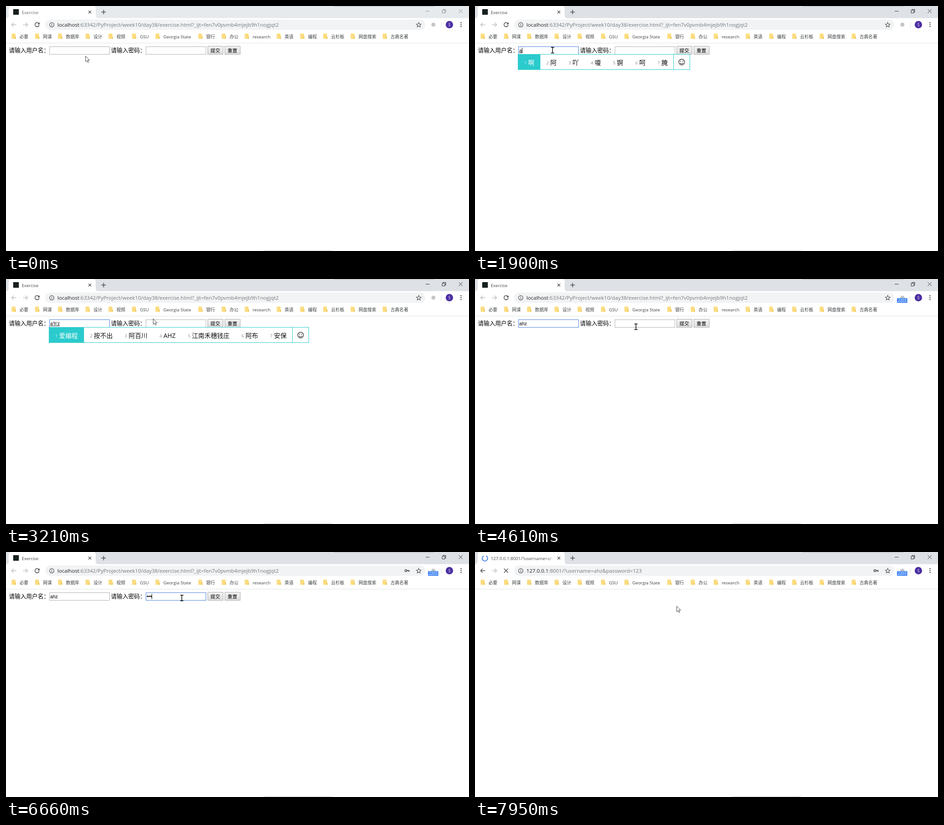
These frames come from a looping animation (1027 by 545 pixels, 8 s). An HTML page:

```html
<!DOCTYPE html>
<html lang="zh-CN">
<head>
<meta charset="utf-8">
<title>Exercise</title>
<style>
  html, body { margin: 0; width: 100%; height: 100%; overflow: hidden; background: #fff; }
  svg { display: block; width: 1027px; height: 545px; }
  text { font-family: "Open Sans", "Noto Sans CJK SC", "Noto Sans CJK", sans-serif; white-space: pre; }
  .field { font-family: "Liberation Sans", "Noto Sans CJK SC", sans-serif; }
</style>
</head>
<body>
<svg id="stage" viewBox="0 0 1027 545" xmlns="http://www.w3.org/2000/svg"></svg>
<script>
const LOOP = 8000, BLINK = 530;
const FOCUS = 1200, COMMIT = 3770, BADGE = 3840, PASSWORD = 5030;
const PRESS = 7210, SUBMIT = 7400, LOADED = 7700;
const TEAL = '#2bcbcd', DARK = '#4a4d51';
const IME_SIZE = 13.93, IME_PAD = 35.36;

const rect = (x, y, w, h, fill, extra = '') =>
  `<rect x="${x}" y="${y}" width="${w}" height="${h}" fill="${fill}" ${extra}/>`;
const line = (d, color, w = 1, extra = '') =>
  `<path d="${d}" fill="none" stroke="${color}" stroke-width="${w}" ${extra}/>`;
const circle = (x, y, r, fill, extra = '') =>
  `<circle cx="${x}" cy="${y}" r="${r}" fill="${fill}" ${extra}/>`;
const text = (x, y, size, fill, str, extra = '') =>
  `<text x="${x}" y="${y}" font-size="${size}" fill="${fill}" ${extra}>${str}</text>`;

// Typed text of the user field: time, shown text, width
const typed = [
  [1740, 'a', 6],
  [2450, "a'h", 14],
  [2680, "a'h'z", 21.3],
  [COMMIT, 'ahz', 17.2]
];
const dotTimes = [5960, 6260, 6510];
const caretResets = [FOCUS, 1740, 2450, 2680, BADGE, PASSWORD, ...dotTimes];

const candidates = [
  [1900, ['啊', '阿', '吖', '嗄', '锕', '呵', '腌']],
  [2450, ['阿布', '安保', '按比', '爱不', '阿爸', '阿伯', '按部']],
  [2680, ['爱编程', '按不出', '阿百川', 'AHZ', '江南禾穗钱庄', '阿布', '安保']]
];

// Pointer moves: first step, last step, number of steps, end point
const moves = [
  [200, 510, 5, 172, 98],
  [660, 660, 1, 165, 95],
  [750, 750, 1, 176, 101],
  [1080, 1300, 3, 172, 98],
  [2680, 2980, 5, 326, 88],
  [4380, 4380, 1, 331, 97],
  [4530, 4610, 2, 357, 106],
  [4780, 4950, 3, 360, 102],
  [6580, 7050, 7, 465, 101],
  [7480, 7860, 5, 447, 120]
];

const last = (list, t) => list.filter(item => item[0] <= t).pop();

function pointerAt(t) {
  let x = 176, y = 111;
  for (const [from, to, steps, ex, ey] of moves) {
    if (t < from) break;
    const gap = (to - from) / Math.max(1, steps - 1);
    const done = gap ? Math.min(steps, Math.floor((t - from) / gap + 0.001) + 1) : steps;
    x += (ex - x) * done / steps;
    y += (ey - y) * done / steps;
  }
  return [Math.round(x), Math.round(y)];
}

function bookmarks() {
  const items = [[30, '必要'], [82, '网课'], [133, '数据库'], [194, '设计'], [245, '视频'],
    [297, 'GSU'], [349, 'Georgia State'], [444, '银行'], [496, '办公'], [547, 'research'],
    [618, '英语'], [670, '编程'], [721, '云杉板'], [782, '网盘搜索'], [853, '古典名著']];
  return items.map(([x, name]) =>
    rect(x - 17.5, 61.5, 8.5, 11.5, '#fbdc80', 'rx="0.8"') +
    rect(x - 10, 67.5, 2, 5.5, '#f1c659', 'rx="0.5"') +
    text(x, 71.5, 9.8, '#3c4043', name)).join('');
}

function chrome() {
  const star = Array.from({ length: 10 }, (_, i) => {
    const a = i * Math.PI / 5, r = i % 2 ? 2.5 : 5.6;
    return `${(915.5 + r * Math.sin(a)).toFixed(1)} ${(42 - r * Math.cos(a)).toFixed(1)}`;
  }).join('L');
  return rect(0, 27, 1027, 518, '#fff') +
    '<path d="M0 27Q6 27 6 21V6Q6 0 12 0H193Q199 0 199 6V21Q199 27 205 27Z" fill="#fff"/>' +
    rect(727, 0, 223, 1.5, '#c6c9ce') +
    line('M183 10.5l6 6m0-6l-6 6', DARK, 1.3) +
    line('M211.5 13.5h10m-5-5v10', DARK, 1.5) +
    rect(87, 30, 843, 23, '#f1f3f4', 'rx="11.5"') +
    line('M38 41.5h10m-4.5-4.5l4.5 4.5l-4.5 4.5', '#bdbfc2', 1.4) +
    circle(101.5, 41.8, 4.9, 'none', `stroke="${DARK}" stroke-width="1.2"`) +
    line('M101.5 41v3.3m0-5.2v1.1', DARK, 1.2) +
    line(`M${star}Z`, DARK, 1.1) +
    rect(965, 36, 1, 12, '#dadce0') +
    circle(983.5, 41.5, 8.2, '#4b2da3') +
    text(983.5, 44.7, 8.5, '#fff', 'S', 'text-anchor="middle"') +
    [37.3, 41.5, 45.7].map(y => circle(1009.3, y, 1.3, DARK)).join('') +
    bookmarks() +
    rect(0, 82, 1027, 1, '#e0e2e4') +
    rect(571, 544, 152, 1, '#c9c9c9');
}

function windowBar(t) {
  const active = t >= FOCUS;
  const ink = active ? '#333' : '#8c8f93';
  return rect(0, 0, 1027, 27, active ? '#dee1e6' : '#e7eaed') +
    line('M931 11.5h8.5', ink) +
    line('M967.5 9.5h6v6h-6zM969.5 9.5v-2h6v6h-2', ink) +
    line('M1004.3 7.3l8.4 8.4m0-8.4l-8.4 8.4', ink);
}

function tab(t) {
  const spin = t >= SUBMIT, loaded = t >= LOADED;
  const color = loaded ? '#3b78e0' : '#9aa0a6';
  const turn = (t - 7950) * (loaded ? 0.4 : -0.4);
  const icon = spin
    ? line('M24.5 8.6A6 6 0 1 1 19.5 8.6', color, 1.7, `transform="rotate(${turn.toFixed(1)} 22 14)"`)
    : rect(16, 7, 12.5, 12.5, '#16201f');
  const title = loaded ? '127.0.0.1:8001/?username=ahz' : 'Exercise';
  return icon +
    text(35, 17.5, 9.8, t < FOCUS ? '#6b6e72' : '#45484c', title, 'clip-path="url(#tabClip)"') +
    rect(160, 4, 14, 20, 'url(#fade)');
}

function toolbar(t) {
  const loaded = t >= LOADED;
  const [host, path] = loaded
    ? ['127.0.0.1', ':8001/?username=ahz&amp;password=123']
    : ['localhost', ':63342/PyProject/week10/day38/exercise.html?_ijt=fen7v0pvmb4mjejb9h1nogjqt2'];
  let out = line('M22.5 41.5h-10m4.5-4.5l-4.5 4.5l4.5 4.5', loaded ? DARK : '#bdbfc2', 1.4);
  out += t >= SUBMIT
    ? line('M64.5 37l9 9m0-9l-9 9', DARK, 1.5)
    : line('M72.6 38.5A4.7 4.7 0 1 0 73.6 42.5', DARK, 1.5) +
      `<path d="M74.5 36.3v4.7h-4.7z" fill="${DARK}"/>`;
  out += text(114, 46, 11.62, '#202124', `${host}<tspan fill="#757a7f">${path}</tspan>`);
  if (t >= dotTimes[0])
    out += circle(887, 41.5, 2.2, 'none', `stroke="${DARK}" stroke-width="1.6"`) +
      line('M889.3 41.5h6m-1.6 0v2.6', DARK, 1.8);
  out += circle(948, 41.5, 4.5, '#c4c7ca');
  if (t >= BADGE)
    out += rect(936, 42.5, 23, 10.5, '#4285f4', 'rx="1.5"') +
      text(947.5, 50.9, 8.3, '#fff', '2203', 'text-anchor="middle"');
  return out;
}

const input = (x, focused) =>
  rect(x + 0.5, 90.5, 133, 17, '#fff', `stroke="${focused ? '#4a82dc' : '#b2b2b2'}"`);

const button = (x, name, hot) =>
  rect(x + 0.5, 89.5, 34, 18, hot ? 'url(#hot)' : 'url(#face)', `stroke="${hot ? '#a0a6a6' : '#ababab'}"`) +
  text(x + 6.5, 102.6, 10.67, '#000', name, 'class="field"');

function form(t, [px]) {
  const inUser = t >= FOCUS && t < PASSWORD;
  const inPass = t >= PASSWORD && t < PRESS;
  const word = last(typed, t);
  const dots = dotTimes.filter(d => d <= t).length;
  let out = text(6.4, 103.2, 12.8, '#000', '请输入用户名：') + input(96, inUser) +
    text(232.8, 103.2, 12.8, '#000', '请输入密码：') + input(310, inPass) +
    button(447, '提交', px >= 447 && px <= 482) + button(485, '重置', false);
  if (word) {
    out += text(98, 102.5, 10.67, '#000', word[1], 'class="field"');
    if (t < COMMIT) out += rect(98, 104, word[2], 1, '#333');
  }
  for (let i = 0; i < dots; i++) out += circle(313.9 + 3.75 * i, 98.7, 1.6, '#111');
  if (inUser || inPass) {
    const since = t - caretResets.filter(c => c <= t).pop();
    const x = inPass ? 312 + 3.75 * dots : 98 + (word ? word[2] : 0);
    if (Math.floor(since / BLINK) % 2 === 0) out += rect(Math.round(x), 93, 1, 12, '#000');
  }
  return out;
}

function popup(t) {
  const set = t < COMMIT && last(candidates, t);
  if (!set) return '';
  let x = 95.5, cells = '';
  set[1].forEach((word, i) => {
    const w = IME_PAD + word.length * IME_SIZE * (word < '~' ? 2 / 3 : 1);
    const first = i === 0;
    if (first) cells += rect(95, 107, Math.round(w + 0.5), 35, TEAL);
    cells += text(x + 13.5, 130.3, 9.5, first ? '#d4f5f5' : '#8a8a8a', i + 1) +
      text(x + 22.2, 131.3, IME_SIZE, first ? '#fff' : '#111', word);
    x += w;
  });
  const sep = Math.floor(x) + 0.5, cx = sep + 18;
  return rect(95.5, 107.5, sep - 59.5, 34, '#fff', `stroke="${TEAL}"`) + cells +
    line(`M${sep} 107v35`, TEAL) +
    circle(cx, 124.8, 6.5, 'none', 'stroke="#222" stroke-width="1.2"') +
    circle(cx - 2.4, 122.9, 0.95, '#222') + circle(cx + 2.4, 122.9, 0.95, '#222') +
    line(`M${cx - 3.5} 126.2a3.6 3.6 0 0 0 7 0`, '#222', 1.1);
}

function pointer(t, [x, y]) {
  const overText = t < LOADED && y >= 90 && y <= 107 && x < 444;
  if (overText)
    return line(`M${x - 3.5} ${y - 6}h3l.5.6l.5-.6h3M${x - 3.5} ${y + 6.5}h3l.5-.6l.5.6h3M${x} ${y - 5.5}v11.5`, '#000', 1.4);
  return `<path transform="translate(${x + 0.5} ${y + 0.5})" d="M0 0V12.4L2.8 9.8L4.9 14.2L6.8 13.3L4.8 9H8.7Z" ` +
    'fill="#fff" stroke="#333" stroke-width="0.9"/>';
}

const gradient = (id, a, b) =>
  `<linearGradient id="${id}" x2="0" y2="1"><stop stop-color="${a}"/><stop offset="1" stop-color="${b}"/></linearGradient>`;

const stage = document.getElementById('stage');
stage.innerHTML = '<defs>' + gradient('face', '#f4f4f4', '#dedede') + gradient('hot', '#eaeded', '#dce1e1') +
  '<linearGradient id="fade"><stop stop-color="#fff" stop-opacity="0"/><stop offset="1" stop-color="#fff"/></linearGradient>' +
  `<clipPath id="tabClip">${rect(30, 0, 144, 27, '#000')}</clipPath></defs>` +
  `<g id="bar"></g><g>${chrome()}</g><g id="live"></g>`;

const shown = {};
function show(id, markup) {
  if (shown[id] === markup) return;
  shown[id] = markup;
  document.getElementById(id).innerHTML = markup;
}

function draw(t) {
  const at = pointerAt(t);
  show('bar', windowBar(t));
  show('live', tab(t) + toolbar(t) + (t < LOADED ? form(t, at) : '') + popup(t) + pointer(t, at));
}

const start = performance.now();
function frame() {
  draw((performance.now() - start) % LOOP);
  requestAnimationFrame(frame);
}
frame();
</script>
</body>
</html>
```
